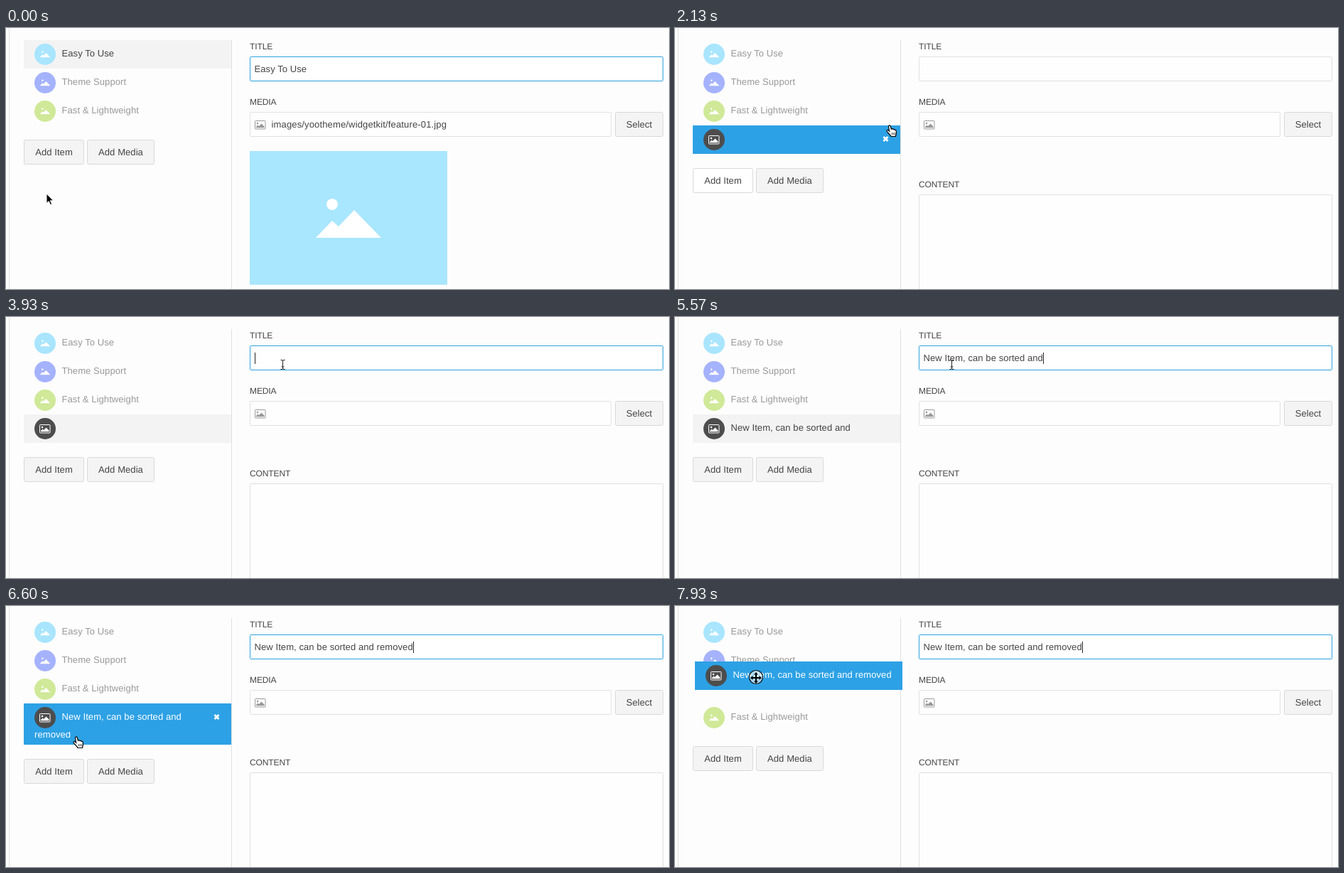
Write an HTML page that moves like this. It is 933 px wide and 367 px high and loops after 8000 ms.

```html
<!DOCTYPE html>
<html lang="en">
<head>
<meta charset="utf-8">
<title>Item list editor</title>
<style>
html, body { margin: 0; width: 100%; height: 100%; overflow: hidden; background: #fdfdfd; }
svg { display: block; width: 933px; height: 367px; }
text {
  font: 13px "Liberation Sans", Arial, sans-serif;
  letter-spacing: .08px;
  white-space: pre;
  text-rendering: geometricPrecision;
  fill: #444;
}
.label { font-size: 12px; letter-spacing: -.1px; }
.path { letter-spacing: .15px; }
.mid { text-anchor: middle; }
</style>
</head>
<body>
<svg id="stage" viewBox="0 0 933 367" xmlns="http://www.w3.org/2000/svg"></svg>
<script>
const LOOP = 8000, START = 500, TICK = 148.6;
const BLUE = '#2da1e5', DARK = '#4d4d4d', MUTED = '#999';
const PHRASE = 'New Item, can be sorted and removed';
const ITEMS = [
  ['Easy To Use', '#a9e5ff'],
  ['Theme Support', '#a5b2fd'],
  ['Fast & Lightweight', '#cfe998']
];
const stage = document.getElementById('stage');

// Pointer waypoints: tick, x, y
const ROUTE = [
  [-1, 57, 233], [0, 58, 222], [2, 65, 180], [9, 65, 180],
  [11, 303, 137], [14, 379, 78], [16, 389, 67], [37, 389, 67],
  [39, 225, 158], [41, 100, 184], [44, 111, 161], [45, 111, 160],
  [46, 111, 158], [48, 113, 120], [50, 114, 101]
];

function pointerAt(k) {
  const i = ROUTE.findIndex(p => p[0] >= k);
  if (i < 1) return ROUTE[i < 0 ? ROUTE.length - 1 : 0].slice(1);
  const [k0, x0, y0] = ROUTE[i - 1], [k1, x1, y1] = ROUTE[i];
  const u = (k - k0) / (k1 - k0);
  return [x0 + (x1 - x0) * u, y0 + (y1 - y0) * u];
}

function typedLength(k) {
  if (k < 24) return 0;
  if (k < 28) return k - 23;
  if (k < 33) return 4 + 5 * (k - 28);
  if (k < 34) return 24;
  return Math.min(27 + 4 * (k - 34), PHRASE.length);
}

const esc = s => s.replace(/&/g, '&amp;');
const text = (x, y, s, cls = '', fill = '#444') =>
  `<text x="${x}" y="${y}" class="${cls}" style="fill:${fill}" xml:space="preserve">${esc(s)}</text>`;
const rect = (x, y, w, h, fill) =>
  `<rect x="${x}" y="${y}" width="${w}" height="${h}" fill="${fill}"/>`;
const frame = (x, y, w, h, fill, stroke, r = 1) =>
  `<rect x="${x + .5}" y="${y + .5}" width="${w - 1}" height="${h - 1}" rx="${r}" fill="${fill}" stroke="${stroke}"/>`;

const button = (x, y, w, s, fill = '#f4f4f4', stroke = '#d9d9d9') =>
  frame(x, y, w, 35, fill, stroke, 2) + text(x + w / 2, y + 22, s, 'mid');

const scenery = (x, y, scale) =>
  `<g transform="translate(${x} ${y}) scale(${scale})" fill="#fff">
    <circle cx="-23" cy="-27" r="8"/><path d="M-46 20L-23-4-14 4 8-19 46 20z"/></g>`;

const pictureIcon = (x, y, color) =>
  `<g transform="translate(${x} ${y})" fill="${color}">
    <rect x=".5" y=".5" width="14.5" height="11.5" rx=".8" fill="none" stroke="${color}"/>
    <circle cx="4" cy="4" r="1.3"/><path d="M2 10.3V9L4.500 6.500 6 8 9.500 4.500 13.500 8.500V10.300z"/></g>`;

function thumb(x, y, color) {
  const art = color === DARK ? pictureIcon(x - 8, y - 6, '#fff') : scenery(x, y + 1, .16);
  return `<circle cx="${x}" cy="${y}" r="15" fill="${color}"/>` + art;
}

function row(x, y, [name, color], fill, ink) {
  return (fill ? rect(x, y, 292, 40, fill) : '') +
    thumb(x + 30, y + 20, color) + text(x + 53.5, y + 23, name, '', ink);
}

const SHAPES = {
  arrow: `<path d="M0 0V13.500L3.200 10.600 5.400 15.600 7.600 14.600 5.400 9.800H9.600z" stroke="#fff"/>`,
  hand: `<path d="M-2.500 1.500C-2.500-.5-.3-.8.2 1l1.200 4.200c.8-1 2.200-.6 2.500.4.900-.7 2-.2 2.300.8 1-.4 1.900.1 2 1.200l.3 3.200c0 1.700-.9 2.700-1 4.700h-6.500c-.6-2-4-4.300-5.800-7.200-.8-1.400.8-2.500 2.100-1.400l1.300 1.300z" fill="#fff" stroke="#000" stroke-width="1.200"/>
    <path d="M2.500 10v3.500M4.500 10v3.500M6.500 10v3.500" stroke="#000" stroke-width=".7"/>`,
  beam: `<path d="M-2.500-6.500H-1Q.5-6.500.5-5V5Q.5 6.500-1 6.500H-2.500M3.500-6.500H2Q.5-6.500.5-5M3.500 6.500H2Q.5 6.500.5 5M-1.500 3H2.500" fill="none" stroke="#222"/>`,
  move: `<path d="M-5 0H5M0-5V5" stroke="#000" stroke-width="2"/>
    <path d="M0-8L3-4.500H-3zM0 8L3 4.500H-3zM-8 0L-4.500-3V3zM8 0L4.500-3V3z"/>`
};

function pointer(k, x, y) {
  let shape = 'arrow';
  if (k >= 45) shape = 'move';
  else if ((k >= 2 && k < 7) || k === 10 || k === 11 || k >= 39) shape = 'hand';
  else if (k >= 14 && k < 38) shape = 'beam';
  const pressed = k === 5 || k === 6 || k === 17 || k >= 45;
  const ring = pressed
    ? `<circle cy="-1" r="9.500" fill="#fff" fill-opacity=".6" stroke="#111" stroke-width="1.200"/>` : '';
  return `<g transform="translate(${x} ${y})">${ring}${SHAPES[shape]}</g>`;
}

function sidebar(k, x, y) {
  const added = k >= 7, hover = k === 10 || k === 11 || (k >= 39 && k < 46), drag = k >= 46;
  const typed = PHRASE.slice(0, typedLength(k));
  const wrap = hover && typed === PHRASE;
  const cut = PHRASE.lastIndexOf(' ');
  let out = ITEMS.map((item, i) => {
    const active = !added && i === 0;
    const slot = i === 2 && k >= 48 ? 3 : i;
    return row(25, 17 + 40 * slot, item, active ? '#f3f3f3' : '', active ? '#444' : MUTED);
  }).join('');

  if (added && !drag) {
    if (wrap) out += rect(25, 177, 292, 18, BLUE) + text(40, 185, PHRASE.slice(cut + 1), '', '#fff');
    out += row(25, 137, [wrap ? PHRASE.slice(0, cut) : typed, DARK],
      hover ? BLUE : '#f3f3f3', hover ? '#fff' : '#444');
    if (hover) out += `<path d="M293.500 153l6 6m0-6l-6 6" stroke="#fff" stroke-width="2.800"/>`;
  }

  const top = wrap ? 215 : added ? 197 : 157;
  let face = ['#f4f4f4', '#d9d9d9'];
  if (k === 5 || k === 6) face = ['#eee', '#bbb'];
  else if (k >= 2 && k < 17) face = ['#fff', '#d9d9d9'];
  out += button(25, top, 85, 'Add Item', ...face) + button(114, top, 95, 'Add Media');
  if (drag) out += row(x - 86, y - 23, [PHRASE, DARK], BLUE, '#fff');
  return out;
}

function form(k) {
  const added = k >= 7;
  let border = '#2ea3de';
  if (k === 6) border = '#4fb0e2';
  else if (added && k < 17) border = '#e0e0e0';
  else if (k === 17) border = '#8cc6e6';
  const title = added ? PHRASE.slice(0, typedLength(k)) : ITEMS[0][0];
  const focused = !added || k >= 17;
  return text(343, 30, 'TITLE', 'label') +
    frame(343, 40, 582, 35, focused ? '#fff' : '#fefefe', border) +
    `<text id="title" x="349.500" y="62" xml:space="preserve">${title}</text>` +
    text(343, 108, 'MEDIA', 'label') +
    frame(343, 118, 509, 35, '#fefefe', '#e0e0e0') +
    pictureIcon(350, 130, MUTED) +
    button(857, 118, 68, 'Select') +
    (added
      ? text(343, 224, 'CONTENT', 'label') + frame(343, 234, 582, 180, '#fefefe', '#e0e0e0')
      : text(373.5, 140, 'images/yootheme/widgetkit/feature-01.jpg', 'path') +
        rect(343, 173, 278, 188, '#a9e6ff') + scenery(482, 275, 1));
}

const caretOn = k => (k >= 0 && k < 5) || k === 18 || k === 19 ||
  (k >= 23 && k < 36) || k >= 38;

function draw(k) {
  const [x, y] = pointerAt(k);
  stage.innerHTML = rect(0, 0, 933, 367, '#fdfdfd') +
    rect(4, 0, 1, 367, '#e0e0e0') + rect(317, 17, 1, 350, '#e0e0e0') +
    form(k) + `<rect id="caret" y="50" width="1" height="16" fill="#222"/>` +
    sidebar(k, x, y) + pointer(k, x, y);
  const caret = stage.querySelector('#caret');
  const width = stage.querySelector('#title').getComputedTextLength();
  caret.setAttribute('x', Math.round(350 + width));
  caret.setAttribute('visibility', caretOn(k) ? 'visible' : 'hidden');
}

let shown = null;
function update(now) {
  const t = now % LOOP;
  const k = Math.max(-1, Math.floor((t - START) / TICK + .07));
  if (k !== shown) draw(shown = k);
  requestAnimationFrame(update);
}
update(performance.now());
</script>
</body>
</html>
```
